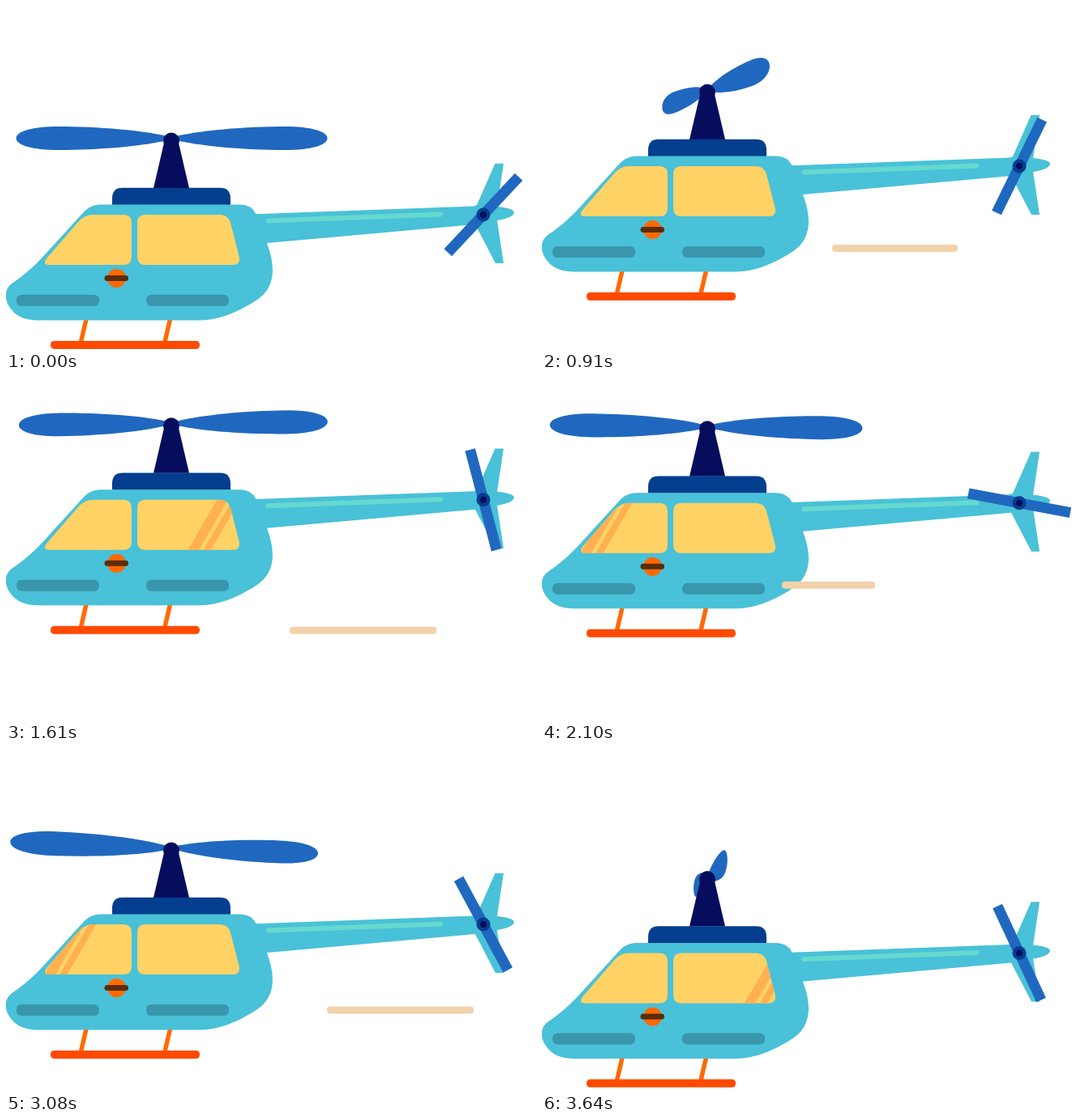
These frames come from a looping animation (654 by 424 pixels, 3.71 s). An HTML page with a canvas:

```html
<!DOCTYPE html>
<html lang="en">
<head>
<meta charset="utf-8">
<title>Helicopter</title>
<style>
  html, body { margin: 0; width: 654px; height: 424px; overflow: hidden; background: #fff; }
  canvas { display: block; }
</style>
</head>
<body>
<canvas id="stage" width="654" height="424"></canvas>
<script>
const ctx = document.getElementById('stage').getContext('2d');
const STEP = 70, STEPS = 53, PEAK = 26, RISE = 120;
const C = {
  body: '#49c1d8', shine: '#66d9cf', blade: '#2068bf', hood: '#043e8e', mast: '#050d5c',
  glass: '#ffd266', glint: '#ffb050', slot: '#3996ad', orange: '#ff6a00',
  skid: '#ff4a00', handle: '#5a2d0a', wind: '#f2d2ab'
};

const cabin = new Path2D('M115 245.5H290Q303 246 308.5 257L322 293C326 305 329 314 329 328C328 346 321 357 304 367' +
  'C284 379 262 388.5 240 388.5H42C22 388.5 12 383 5 373C-3 362 -2 349 8 342.5C23 332.5 35 321.5 46 309.5L91.5 259.5Q102.5 245.5 115 245.5Z');
const tail = new Path2D('M300 257.5L577 247.5L581 246L603.5 194.7H614L606 248Q627 250 627 255.5Q625 262 606 265L614 318H604L579 270L300 295Z');
const leftGlass = new Path2D('M107 258H145Q155 258 155 268V310Q155 320 145 320H52Q45 319 50 312L89 267Q97 258 107 258Z');
const rightGlass = new Path2D('M172 258H264Q274 258 277 268L288 311Q289 320 280 320H172Q162 320 162 310V268Q162 258 172 258Z');
const hood = new Path2D('M131 246V238Q131 224.7 144 224.7H264Q277 224.7 277 238V246Z');
const mast = new Path2D('M196 165H212L226 225H182Z');

// Wind streaks: start step, length, height
const winds = [
  [7.8, 155, 359.5],
  [17.36, 181, 419.5],
  [27.24, 155, 359.5],
  [37.26, 181, 364]
];
const WIND_X = 296, WIND_TRAVEL = 292, WIND_SPEED = 41.7;

function fill(path, color) {
  ctx.fillStyle = color;
  ctx.fill(path);
}

function disc(x, y, r, color) {
  ctx.fillStyle = color;
  ctx.beginPath();
  ctx.arc(x, y, r, 0, Math.PI * 2);
  ctx.fill();
}

function bar(x, y, w, h, r, color) {
  ctx.fillStyle = color;
  ctx.beginPath();
  ctx.roundRect(x, y, w, h, r);
  ctx.fill();
}

function line(x1, y1, x2, y2, width, color, cap = 'butt') {
  ctx.strokeStyle = color;
  ctx.lineWidth = width;
  ctx.lineCap = cap;
  ctx.beginPath();
  ctx.moveTo(x1, y1);
  ctx.lineTo(x2, y2);
  ctx.stroke();
}

// Flat rotor turning about its vertical axis, seen in perspective
function mainRotor(angle, lift) {
  const depth = 1136, eyeX = 321, eyeY = 265, x0 = 204.5, y0 = 163.5 - lift;
  const cos = Math.cos(angle), sin = Math.sin(angle);
  const project = (u, v) => {
    const s = 1 / (1 - u * sin / depth);
    return [eyeX + (x0 + u * cos - eyeX) * s, eyeY + (y0 + v - eyeY) * s + lift];
  };
  ctx.fillStyle = C.blade;
  for (const side of [-1, 1]) {
    const p = (u, v) => project(u * side, v);
    ctx.beginPath();
    ctx.moveTo(...p(0, -1));
    ctx.bezierCurveTo(...p(32, -10), ...p(92, -14.5), ...p(140, -14.5));
    ctx.bezierCurveTo(...p(172, -14.5), ...p(192, -8.5), ...p(192, 0));
    ctx.bezierCurveTo(...p(192, 8.5), ...p(172, 14.5), ...p(140, 14.5));
    ctx.bezierCurveTo(...p(92, 14.5), ...p(32, 10), ...p(0, 1));
    ctx.fill();
  }
}

function tailRotor(angle) {
  ctx.save();
  ctx.translate(589, 258);
  ctx.rotate(-angle);
  ctx.fillStyle = C.blade;
  ctx.fillRect(-64, -6.5, 128, 13);
  ctx.restore();
  disc(589, 258, 8.5, C.hood);
  disc(589, 258, 4, C.mast);
}

function glint(pane, shift) {
  ctx.save();
  ctx.clip(pane);
  ctx.fillStyle = C.glint;
  for (const [x, w] of [[224.5, 13.5], [243.5, 9]]) {
    ctx.beginPath();
    ctx.moveTo(x + shift, 320);
    ctx.lineTo(x + w + shift, 320);
    ctx.lineTo(x + w + 36 + shift, 258);
    ctx.lineTo(x + 36 + shift, 258);
    ctx.fill();
  }
  ctx.restore();
}

function wind(n, [start, length, y]) {
  const head = (n - start) * WIND_SPEED;
  const from = Math.max(0, head - length), to = Math.min(WIND_TRAVEL, head);
  if (to - from > 2) bar(WIND_X + from, y - 4.5, to - from, 9, 4, C.wind);
}

function draw(n) {
  const lift = RISE * (n < PEAK ? n / PEAK : (STEPS - n) / (STEPS - PEAK));
  const turn = n / STEPS * Math.PI;
  ctx.fillStyle = '#fff';
  ctx.fillRect(0, 0, 654, 424);
  ctx.save();
  ctx.translate(0, -lift);

  mainRotor(turn * 30, lift);
  fill(mast, C.mast);
  disc(204, 166.5, 10, C.mast);
  fill(hood, C.hood);

  for (const x of [99.3, 202.8]) line(x, 386, x - 7, 416, 5.5, C.orange);
  bar(55, 414, 184, 10, 4.5, C.skid);

  fill(tail, C.body);
  fill(cabin, C.body);
  line(323.5, 265.5, 536.5, 257.5, 6, C.shine, 'round');

  const shift = (n % 14 - 9) * 25.3;
  for (const pane of [leftGlass, rightGlass]) {
    fill(pane, C.glass);
    glint(pane, shift);
  }
  disc(136.5, 336.5, 11.5, C.orange);
  bar(121.5, 333, 29.5, 7, 3.5, C.handle);
  for (const x of [13, 173]) bar(x, 357, 102, 14, 6, C.slot);

  tailRotor(47 * Math.PI / 180 + turn * 33);
  for (const w of winds) wind(n, w);
  ctx.restore();
}

const begin = performance.now();
function tick() {
  draw(Math.floor((performance.now() - begin) / STEP) % STEPS);
  requestAnimationFrame(tick);
}
tick();
</script>
</body>
</html>
```
